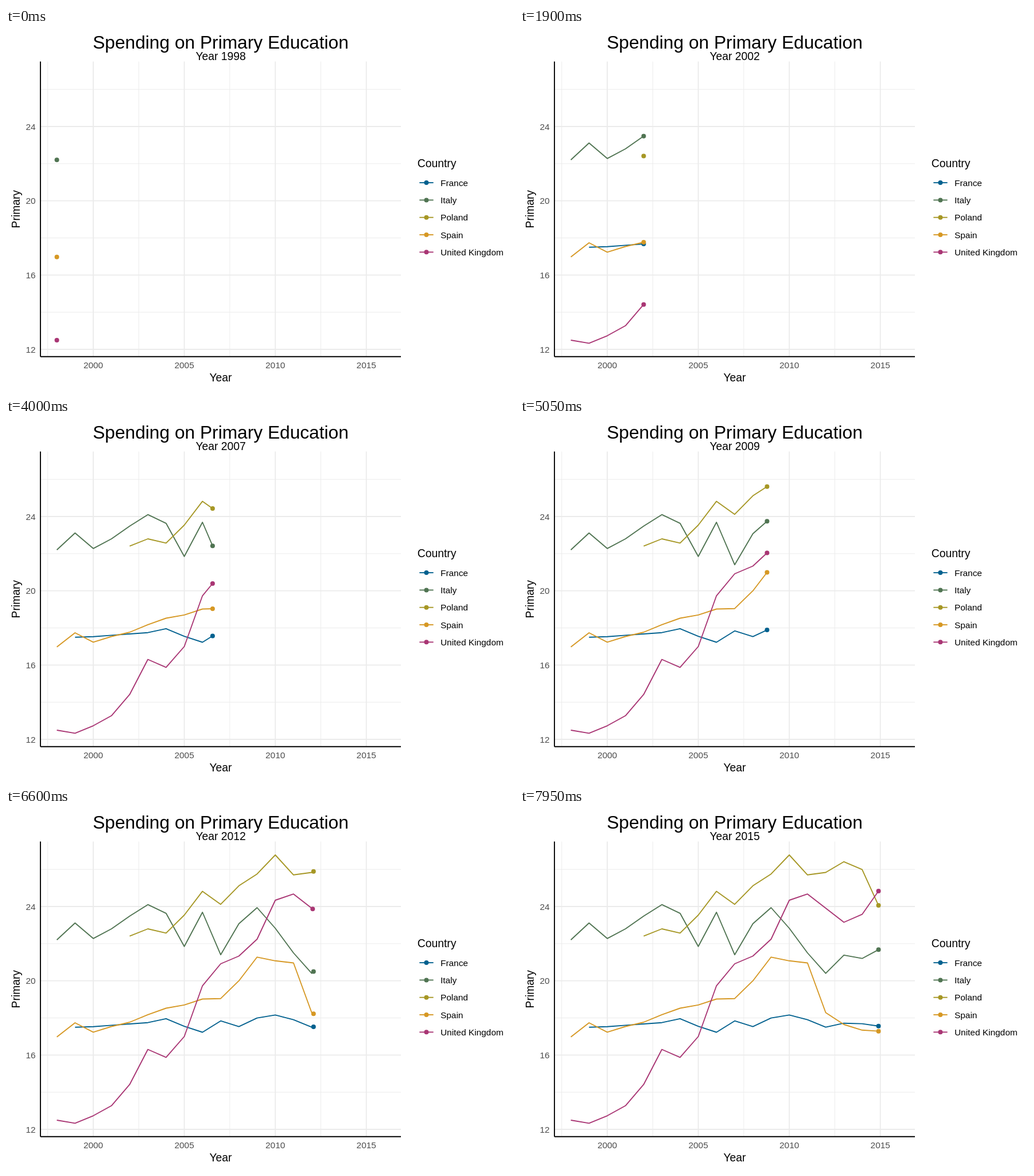
Animation of 885x632 px, one loop 8 s. Source, as an HTML page with a canvas:

```html
<!DOCTYPE html>
<html lang="en">
<head>
<meta charset="utf-8">
<title>Spending on Primary Education</title>
<style>
  html, body { margin: 0; width: 100%; height: 100%; overflow: hidden; background: #fff; }
  canvas { display: block; }
</style>
</head>
<body>
<canvas id="chart" width="885" height="632"></canvas>
<script>
const ctx = document.getElementById("chart").getContext("2d");

const FRAME_MS = 50, FRAMES = 160;
const FIRST_YEAR = 1998, SPAN = 18, LAST_STEP = 169;
const LEFT = 60, RIGHT = 688, TOP = 58.6, BOTTOM = 573.7;
const MID = (LEFT + RIGHT) / 2;
const LINE = 1.87, DOT = 4;
const BASE = 19.3, SMALL = 15.4, LARGE = 31.7;

// Heights of yearly values in stage pixels; null marks a missing year.
const series = [
  { name: "France", color: "#00618f", start: 1999,
    ys: [382.7, 381.7, 379.4, 377, 374.7, 367.8, 381.2, 391.5, 371.7, 381.7, 366.7, 361.4, 369.7, 382.7, 375.7, 376.6, 381.2] },
  { name: "Italy", color: "#507452", start: 1998,
    ys: [230.3, 200.8, 227.8, 211, 188.8, 168.7, 183.8, 241.7, 182, 256.2, 202, 174, 210, 253, 288.7, 256.8, 262.7, 245.6] },
  { name: "Poland", color: "#a69725", start: 2002,
    ys: [223.6, 211, 218.3, 187, 145.4, 168.2, 135.8, 115.2, 82, 116.8, 112.5, 93.8, 107.3, 177] },
  { name: "Spain", color: "#d69824", start: 1998,
    ys: [399.8, 375, 391.3, 381.5, 374, 360.8, 349.5, 343.8, 333.5, 332.7, 301.7, 260.3, 266.8, 270.5, 357.3, 378, 387.8, 389.9] },
  { name: "United Kingdom", color: "#a93674", start: 1998,
    ys: [545, 550.3, 537.3, 519.8, 482.7, 421.5, 435.3, 399, 310.3, 272, 258.5, 229, 161, 150.2, null, 199.5, 185.7, 140.5] }
];

const xOf = year => 152 + (year - 2000) * 31.715;
const yOf = value => 172 + (24 - value) * 32.42;
// Whole step at which a year is reached; exact halves go down.
const stepOf = year => Math.round((year - FIRST_YEAR) * LAST_STEP / SPAN - 1e-6);

for (const s of series) {
  s.points = s.ys
    .map((y, i) => ({ x: xOf(s.start + i), y, step: stepOf(s.start + i) }))
    .filter(p => p.y !== null);
}

function stroke(points, color, width) {
  ctx.strokeStyle = color;
  ctx.lineWidth = width;
  ctx.lineJoin = "round";
  ctx.beginPath();
  points.forEach(p => ctx.lineTo(p.x, p.y));
  ctx.stroke();
}

function segment(x1, y1, x2, y2, color, width) {
  stroke([{ x: x1, y: y1 }, { x: x2, y: y2 }], color, width);
}

function dot(x, y, color) {
  ctx.fillStyle = color;
  ctx.beginPath();
  ctx.arc(x, y, DOT, 0, 2 * Math.PI);
  ctx.fill();
}

function text(label, x, y, size, align = "center", color = "#000") {
  ctx.font = `${size}px "Liberation Sans", Arial, sans-serif`;
  ctx.textAlign = align;
  ctx.fillStyle = color;
  ctx.fillText(label, x, y);
}

function drawGrid() {
  const vertical = (year, w) => segment(xOf(year), TOP, xOf(year), BOTTOM, "#ebebeb", w);
  const horizontal = (value, w) => segment(LEFT, yOf(value), RIGHT, yOf(value), "#ebebeb", w);
  for (let v = 14; v <= 26; v += 4) horizontal(v, LINE / 2);
  for (let y = 1997.5; y < 2015; y += 5) vertical(y, LINE / 2);
  for (let v = 12; v <= 24; v += 4) horizontal(v, LINE);
  for (let y = 2000; y <= 2015; y += 5) vertical(y, LINE);
}

function drawAxes() {
  segment(LEFT, TOP, LEFT, BOTTOM, "#000", LINE);
  segment(LEFT, BOTTOM, RIGHT, BOTTOM, "#000", LINE);
  for (let v = 12; v <= 24; v += 4) text(v, 51.5, yOf(v) + 5.6, SMALL, "right", "#4d4d4d");
  for (let y = 2000; y <= 2015; y += 5) text(y, xOf(y), 593.8, SMALL, "center", "#4d4d4d");
  text("Year", MID, 617.3, BASE);
  ctx.save();
  ctx.translate(23.8, 316.2);
  ctx.rotate(-Math.PI / 2);
  text("Primary", 0, 0, BASE);
  ctx.restore();
}

function drawLegend() {
  text("Country", 716.8, 243.2, BASE, "left");
  series.forEach((s, i) => {
    const y = 270.1 + i * 30.3;
    segment(720.3, y, 744.6, y, s.color, LINE);
    dot(732.4, y, s.color);
    text(s.name, 757, y + 5.6, SMALL, "left");
  });
}

// Position of a series' head between its neighbouring data points.
function headAt(points, step) {
  const next = points.findIndex(p => p.step > step);
  const a = points[next - 1], b = points[next];
  const t = (step - a.step) / (b.step - a.step);
  return { x: a.x + (b.x - a.x) * t, y: a.y + (b.y - a.y) * t };
}

function draw(step) {
  ctx.fillStyle = "#fff";
  ctx.fillRect(0, 0, 885, 632);
  drawGrid();

  const active = series.filter(s => s.points[0].step <= step);
  const heads = active.map(s => headAt(s.points, step));
  active.forEach((s, i) => {
    const past = s.points.filter(p => p.step <= step);
    stroke([...past, heads[i]], s.color, LINE);
  });
  active.forEach((s, i) => dot(heads[i].x, heads[i].y, s.color));

  drawAxes();
  drawLegend();
  text("Spending on Primary Education", MID, 36.2, LARGE);
  text("Year " + Math.round(FIRST_YEAR + step * SPAN / LAST_STEP), MID, 56.1, BASE);
}

const began = performance.now();
function tick() {
  const elapsed = Math.max(0, performance.now() - began);
  draw(Math.floor(elapsed / FRAME_MS) % FRAMES);
  requestAnimationFrame(tick);
}
tick();
</script>
</body>
</html>
```
